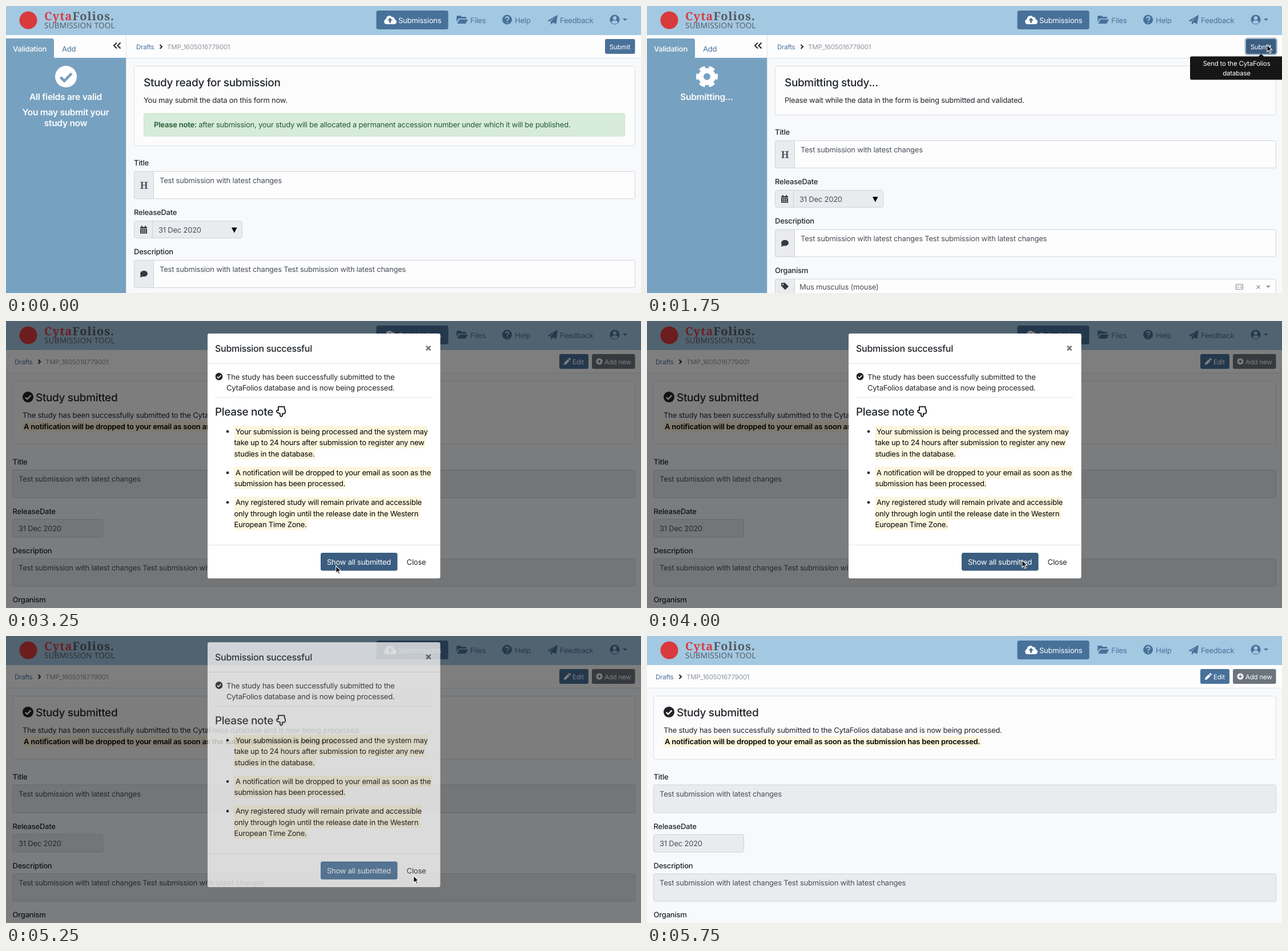
These frames come from a looping animation (1112x504 px, 6.5 s). An HTML page:

```html
<!DOCTYPE html>
<html lang="en">
<head>
<meta charset="utf-8">
<title>Submission tool</title>
<style>
  html, body { margin: 0; width: 100%; height: 100%; overflow: hidden; background: #f8f9fb; }
  svg { display: block; width: 1112px; height: 504px; }
  text {
    font: 13px Inter, "Open Sans", sans-serif;
    font-optical-sizing: none;
    letter-spacing: -.017em;
    text-rendering: geometricPrecision;
    fill: #212529;
  }
  .label { font-weight: 500; }
  .value { fill: #495057; }
  .small { font-size: 11.5px; }
  .h4 { font-size: 19px; font-weight: 500; letter-spacing: -.019em; }
  .h5 { font-size: 16px; font-weight: 500; letter-spacing: -.018em; }
  .side { font-size: 15.5px; font-weight: 600; text-anchor: middle; }
  .strong { font-weight: 600; letter-spacing: -.016em; }
  .mid { text-anchor: middle; }
  .white { fill: #fff; }
  .blue { fill: #48719a; }
  .muted { fill: #8f969d; }
  .black { fill: #000; }
  .name { font: 700 20px "Noto Serif", serif; letter-spacing: 1.1px; fill: #54585c; }
  .tool { font: 13.5px "Open Sans", sans-serif; letter-spacing: .25px; fill: #54585c; }
  .red { fill: #d93a3c; }
  .card { fill: #fcfcfd; stroke: #dcdee1; }
  .input { fill: #fdfdfe; stroke: #ced4da; }
  .addon { fill: #e9ebef; stroke: #ced4da; }
  .rule { stroke: #dee2e6; }
  .mark { fill: #fdf6df; }
  .line { fill: none; stroke: #212529; stroke-width: 2; }

  /* Every scene change is a hard cut on a quarter-second grid. */
  .a { animation: 6.5s step-end infinite; }
  #form { animation-name: form; }
  #ready { animation-name: ready; }
  #busy { animation-name: busy; }
  #fields { animation-name: fields; }
  #done { animation-name: done; }
  #shade { animation-name: shade; }
  #modal { animation-name: modal; }
  #hint { animation-name: hint; }
  #submit { animation-name: submit; }
  #all { animation-name: all; }
  #cursor { animation-name: cursor; }

  @keyframes form { 0% { visibility: visible } 30.76%, to { visibility: hidden } }
  @keyframes ready { 0% { opacity: 1 } 26.92%, to { opacity: 0 } }
  @keyframes busy { 0% { opacity: 0 } 26.92%, to { opacity: 1 } }
  @keyframes fields { 0% { transform: none } 26.92%, to { transform: translateY(-54px) } }
  @keyframes done { 0% { opacity: 0 } 30.76%, to { opacity: 1 } }
  @keyframes shade { 0% { opacity: 0 } 30.76% { opacity: .5 } 88.46%, to { opacity: 0 } }
  @keyframes modal {
    0% { opacity: 0; transform: none }
    30.76% { opacity: 1; transform: none }
    80.76% { opacity: .73; transform: translateY(-11px) }
    84.61%, to { opacity: 0; transform: none }
  }
  @keyframes hint { 0% { opacity: 0 } 19.23% { opacity: 1 } 30.76%, to { opacity: 0 } }
  @keyframes submit {
    0% { fill: #48719a; stroke: transparent }
    19.23% { fill: #3b5d7f; stroke: transparent }
    26.92%, to { fill: #3b5d7f; stroke: #a3b9cd }
  }
  @keyframes all { 0% { fill: #48719a } 50% { fill: #3b5d7f } 69.23%, to { fill: #48719a } }
  @keyframes cursor {
    0% { opacity: 0; transform: translate(926px, 116px) }
    3.84% { opacity: 1; transform: translate(926px, 116px) }
    11.53% { opacity: 1; transform: translate(953px, 111px) }
    15.38% { opacity: 1; transform: translate(1099px, 65px) }
    19.23% { opacity: 1; transform: translate(1085px, 66px) }
    23.07% { opacity: 1; transform: translate(1085px, 67px) }
    30.76% { opacity: 1; transform: translate(967px, 128px) }
    34.61% { opacity: 1; transform: translate(662px, 232px) }
    42.3% { opacity: 1; transform: translate(613px, 342px) }
    46.15% { opacity: 1; transform: translate(568px, 414px) }
    50% { opacity: 1; transform: translate(577px, 429px) }
    53.84% { opacity: 1; transform: translate(630px, 419px) }
    57.69% { opacity: 1; transform: translate(643px, 419px) }
    61.53% { opacity: 1; transform: translate(656px, 419px) }
    65.38% { opacity: 1; transform: translate(665px, 419px) }
    69.23% { opacity: 1; transform: translate(696px, 420px) }
    73.07% { opacity: 1; transform: translate(713px, 420px) }
    84.61% { opacity: 1; transform: translate(743px, 315px) }
    88.46%, to { opacity: 0; transform: translate(743px, 315px) }
  }
</style>
</head>
<body>
<svg viewBox="0 0 1112 504">
  <defs>
    <symbol id="check" viewBox="0 0 40 40">
      <circle cx="20" cy="20" r="20" fill="currentColor"/>
      <path d="M10 21l7 7 13.5-14" fill="none" stroke="var(--tick)" stroke-width="5"/>
    </symbol>
  </defs>
  <rect width="1112" height="504" fill="#f8f9fb"/>

  <g id="header">
    <rect width="1112" height="51" fill="#a3c8e2"/>
    <circle class="red" cx="39" cy="25" r="15.5"/>
    <text class="name" x="67" y="25"><tspan class="red">Cyta</tspan>Folios.</text>
    <text class="tool" x="67" y="39">SUBMISSION TOOL</text>

    <rect class="blue" x="648.5" y="8" width="126" height="33" rx="3.5"/>
    <path class="white" d="M666.500 32a4.600 4.600 0 0 1-1-9a5.800 5.800 0 0 1 10.500-3.500a3.600 3.600 0 0 1 4.500 4a4.300 4.300 0 0 1-1.500 8.500z"/>
    <path class="blue" d="M671 29.5v-4h-3l4.500-5 4.500 5h-3v4z"/>
    <text class="white" x="687" y="29.5">Submissions</text>

    <g class="blue">
      <path d="M789 28V18.500q0-1.500 1.500-1.500H796l2 2h6.500q1.500 0 1.500 1.500V22H794q-1.500 0-2 1z"/>
      <path d="M790 31l3.500-6.500q.5-1 1.500-1h14l-3.500 6.500q-.5 1-1.500 1z"/>
      <circle cx="877.500" cy="24" r="8.500"/>
      <path d="M948 26l18-10.500-2.500 16-6-2.500-3 4-.8-5.500 8-8.500-9.500 8z"/>
      <circle cx="1066" cy="24" r="8.500"/>
      <path d="M1080 22h8l-4 4z"/>
    </g>
    <path d="M874.700 22q.3-3 3-3t2.800 2.500q0 1.500-1.500 2.300-1.400.8-1.400 2.200m0 1.700v2" fill="none" stroke="#a3c8e2" stroke-width="1.900"/>
    <g fill="#a3c8e2">
      <circle cx="1066" cy="21.200" r="3.200"/>
      <path d="M1060.500 29.500q.5-4 3.500-4h4q3 0 3.500 4-5.500 4-11 0z"/>
    </g>
    <text class="blue" x="813" y="29.500">Files</text>
    <text class="blue" x="891" y="29.500">Help</text>
    <text class="blue" x="970" y="29.500">Feedback</text>
  </g>

  <rect y="51" width="1112" height="40" fill="#fdfdfe"/>
  <path class="rule" d="M0 91.500h1112"/>

  <g id="form" class="a">
    <rect y="91" width="210" height="413" fill="#77a1c0"/>
    <path d="M0 91V57h80q4 0 4 4v30z" fill="#77a1c0"/>
    <path class="rule" d="M210.500 51v453"/>
    <text class="label white" x="12" y="79.500">Validation</text>
    <text class="blue" x="98" y="79.500">Add</text>
    <path class="line" d="M194 64.500l-5 5 5 5m6.500-10l-5 5 5 5"/>
    <text class="small blue" x="228" y="75.500">Drafts</text>
    <path class="line" d="M269.500 68l3.500 3.500-3.500 3.500"/>
    <text class="small muted" x="282" y="75.500">TMP_1605016779001</text>

    <g id="ready" class="a">
      <use href="#check" x="86" y="105" width="38" height="38" style="color:#fff;--tick:#77a1c0"/>
      <text class="side white" x="104.500" y="165">All fields are valid</text>
      <text class="side white" x="104.500" y="191.500">You may submit your</text>
      <text class="side white" x="104.500" y="211">study now</text>
      <rect class="card" x="224.500" y="105.500" width="877" height="140" rx="3"/>
      <text class="h4" x="241" y="141">Study ready for submission</text>
      <text x="241" y="169.500">You may submit the data on this form now.</text>
      <rect x="241.500" y="188.500" width="842" height="40" rx="3" fill="#d7ebdb" stroke="#c6e4cd"/>
      <text x="259" y="213" style="fill:#225a30"><tspan class="strong">Please note:</tspan> after submission, your study will be allocated a permanent accession number under which it will be published.</text>
    </g>

    <g id="busy" class="a">
      <g fill="none" stroke="#fff">
        <circle cx="105" cy="124" r="10.500" stroke-width="9"/>
        <circle cx="105" cy="124" r="16" stroke-width="6" pathLength="12" stroke-dasharray="1.200 .8" stroke-dashoffset=".6"/>
      </g>
      <text class="side white" x="104.500" y="165">Submitting...</text>
      <rect class="card" x="224.500" y="105.500" width="877" height="86" rx="3"/>
      <text class="h4" x="241" y="141">Submitting study...</text>
      <text x="241" y="169.500">Please wait while the data in the form is being submitted and validated.</text>
    </g>

    <g id="fields" class="a">
      <text class="label" x="224" y="280">Title</text>
      <rect class="input" x="224.500" y="290.500" width="877" height="48" rx="3"/>
      <rect class="addon" x="224.500" y="290.500" width="34" height="48" rx="2"/>
      <text x="241.500" y="321" class="mid" style="font:700 17px 'Noto Serif',serif;fill:#495057">H</text>
      <text class="value" x="269" y="310.500">Test submission with latest changes</text>

      <text class="label" x="224" y="367">ReleaseDate</text>
      <rect class="addon" x="224.500" y="377.500" width="189" height="30" rx="3"/>
      <path d="M256.500 378v30" stroke="#ced4da"/>
      <g fill="#343a40">
        <path d="M235 388h2v-2h2v2h4v-2h2v2h2v2.500h-12z"/>
        <path d="M235 391.500h12v8h-12z"/>
      </g>
      <path d="M237 394h8m-8 3h8" stroke="#e9ebef" stroke-width="1.700" stroke-dasharray="2 1"/>
      <text class="value" x="267" y="397.500">31 Dec 2020</text>
      <path class="black" d="M395 389h9.500l-4.700 9.500z"/>

      <text class="label" x="224" y="436">Description</text>
      <rect class="input" x="224.500" y="446.500" width="877" height="48" rx="3"/>
      <rect class="addon" x="224.500" y="446.500" width="34" height="48" rx="2"/>
      <ellipse cx="241.500" cy="470" rx="6.500" ry="5.300" fill="#343a40"/>
      <path d="M236 471l-1 5.500 5-1.500z" fill="#343a40"/>
      <text class="value" x="269" y="466.500">Test submission with latest changes Test submission with latest changes</text>

      <text class="label" x="224" y="522.500">Organism</text>
      <rect class="input" x="224.500" y="533.500" width="877" height="30" rx="3"/>
      <rect class="addon" x="224.500" y="533.500" width="34" height="30" rx="2"/>
      <path d="M235 541.500q0-1.500 1.500-1.500h5l6.500 6.500-6 6-7-7z" fill="#343a40"/>
      <circle cx="238" cy="543" r="1.200" fill="#e9ebef"/>
      <text class="value" x="267" y="551.500">Mus musculus (mouse)</text>
      <g fill="none" stroke="#8c9299" stroke-width="1.200">
        <rect x="1031.500" y="542.500" width="12" height="9" rx="1"/>
        <path d="M1033.500 545.500h3m-3 3h3m2-3h4m-4 3h4M1067.500 544.500l6 6m0-6l-6 6"/>
      </g>
      <path d="M1084 545h8l-4 4z" fill="#8c9299"/>
    </g>

    <rect id="submit" class="a" x="1049" y="58" width="52.500" height="26" rx="3" stroke-width="5" paint-order="stroke"/>
    <text class="small white mid" x="1075" y="75.500">Submit</text>
    <g id="hint" class="a">
      <path d="M1070.500 89l5-5 5 5z" fill="#161616"/>
      <rect x="951" y="88.500" width="165" height="41" rx="3" fill="#161616"/>
      <text class="small white mid" x="1032.500" y="105">Send to the CytaFolios</text>
      <text class="small white mid" x="1032.500" y="122">database</text>
    </g>
  </g>

  <g id="done" class="a">
    <text class="small blue" x="15" y="75.500">Drafts</text>
    <path class="line" d="M56.500 68l3.500 3.500-3.500 3.500"/>
    <text class="small muted" x="69" y="75.500">TMP_1605016779001</text>
    <rect class="blue" x="969" y="58" width="51" height="26" rx="3"/>
    <path class="white" d="M977 77l.7-3.700 6-6 3 3-6 6zM984.500 66.500l1.200-1.200q.8-.6 1.500 0l1.500 1.500q.6.7 0 1.500l-1.200 1.200z"/>
    <text class="small white" x="992" y="75.500">Edit</text>
    <rect x="1026" y="58" width="75.500" height="26" rx="3" fill="#6c757d"/>
    <circle class="white" cx="1039" cy="71" r="5.500"/>
    <path d="M1036 71h6m-3-3v6" stroke="#6c757d" stroke-width="1.700"/>
    <text class="small white" x="1048" y="75.500">Add new</text>

    <rect class="card" x="11.500" y="105.500" width="1090" height="111" rx="3"/>
    <use href="#check" x="29" y="124" width="19" height="19" style="color:#212529;--tick:#fcfcfd"/>
    <text class="h4" x="52" y="141">Study submitted</text>
    <text x="29" y="169.500">The study has been successfully submitted to the CytaFolios database and is now being processed.</text>
    <rect class="mark" x="29" y="176" width="556" height="19"/>
    <text class="strong black" x="31" y="190">A notification will be dropped to your email as soon as the submission has been processed.</text>

    <text class="label" x="11.500" y="251.500">Title</text>
    <rect class="addon" x="11.500" y="261.500" width="1090" height="49" rx="3"/>
    <text class="value" x="22" y="282">Test submission with latest changes</text>
    <text class="label" x="11.500" y="338.500">ReleaseDate</text>
    <rect class="addon" x="11.500" y="348.500" width="158" height="31" rx="3"/>
    <text class="value" x="22" y="369">31 Dec 2020</text>
    <text class="label" x="11.500" y="407.500">Description</text>
    <rect class="addon" x="11.500" y="417.500" width="1090" height="48.500" rx="3"/>
    <text class="value" x="22" y="438">Test submission with latest changes Test submission with latest changes</text>
    <text class="label" x="11.500" y="494">Organism</text>
  </g>

  <rect id="shade" class="a" width="1112" height="504"/>

  <g id="modal" class="a">
    <rect x="353" y="22" width="407.500" height="430" rx="3" fill="#fff"/>
    <path class="rule" d="M353 74.500h407M366 134h381M353 393.500h407"/>
    <text class="h5" x="366" y="54">Submission successful</text>
    <path d="M736 44l7.500 7.500m0-7.500l-7.500 7.500" stroke="#777" stroke-width="2.600"/>
    <use href="#check" x="366.500" y="91" width="13" height="13" style="color:#212529;--tick:#fff"/>
    <text x="386" y="102.500">The study has been successfully submitted to the</text>
    <text x="386" y="122">CytaFolios database and is now being processed.</text>
    <text class="h4" x="366" y="166">Please note</text>
    <path class="line" stroke-linejoin="round" d="M477 150.500h10.500v3l1.500 3.500v4q-1 2.500-4 1.500h-1v3.500q-1 2.500-3 1.500-1.500-1-1-5l-4.500-1.500q-3-2.500-.5-4.500l2 .5z"/>

    <path class="mark" d="M399 184h339v19.500h-4v20h-192v19h-143zM399 256h347v20h-152v19h-195zM399 309h329v19h-3v20h-198v19h-128z"/>
    <g class="black">
      <circle cx="388" cy="194" r="2.200"/>
      <circle cx="388" cy="266.500" r="2.200"/>
      <circle cx="388" cy="318.500" r="2.200"/>
    </g>
    <text class="black" x="402" y="198.500">Your submission is being processed and the system may</text>
    <text class="black" x="399.500" y="218">take up to 24 hours after submission to register any new</text>
    <text class="black" x="399.500" y="237.500">studies in the database.</text>
    <text class="black" x="402" y="270.500">A notification will be dropped to your email as soon as the</text>
    <text class="black" x="399.500" y="290">submission has been processed.</text>
    <text class="black" x="402" y="323">Any registered study will remain private and accessible</text>
    <text class="black" x="399.500" y="342.500">only through login until the release date in the Western</text>
    <text class="black" x="399.500" y="362">European Time Zone.</text>

    <rect id="all" class="a" x="551" y="407" width="134.500" height="31.500" rx="3.500"/>
    <text class="white mid" x="618" y="427.500">Show all submitted</text>
    <text class="mid" x="718.500" y="427.500">Close</text>
  </g>

  <path id="cursor" class="a" d="M.8 1v12.500l2.900-2.700 2.200 4.700 2-.9-2.200-4.600h4z" stroke="#fff" stroke-width="1.100"/>
</svg>
</body>
</html>
```
